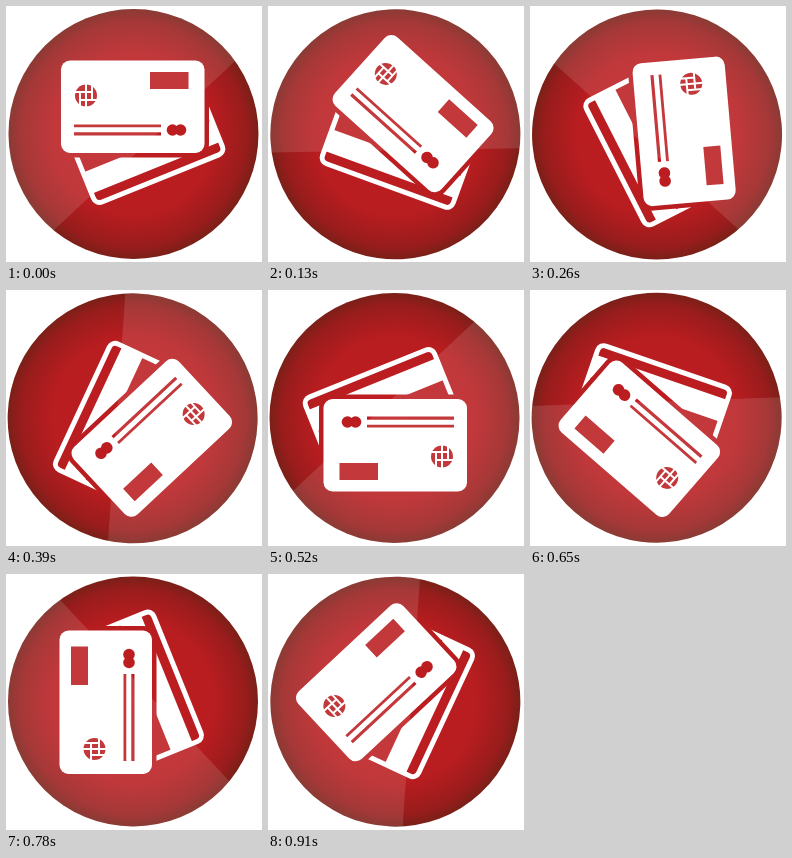
Recreate the animation shown at these times as an HTML page. Size 256 by 256 pixels, loop 1.04 s.

```html
<!DOCTYPE html>
<html lang="en">
<head>
<meta charset="utf-8">
<title>Spinning card badge</title>
<style>
  html, body { margin: 0; width: 100%; height: 100%; overflow: hidden; background: #fff; }
  svg { display: block; width: 100vw; height: 100vh; }
</style>
</head>
<body>
<svg viewBox="0 0 256 256">
  <defs>
    <radialGradient id="red">
      <stop offset="0" stop-color="#c01d20"/>
      <stop offset=".65" stop-color="#b81d20"/>
      <stop offset=".9" stop-color="#991c1c"/>
      <stop offset="1" stop-color="#7a2018"/>
    </radialGradient>
    <clipPath id="disc"><circle cx="127.5" cy="128" r="125"/></clipPath>
    <!-- White areas of the mask become the cards; black areas let the badge through. -->
    <mask id="cards" maskUnits="userSpaceOnUse" x="0" y="0" width="256" height="256">
      <g transform="translate(88 203) rotate(-22)">
        <rect x="1" y="-94" width="144" height="93" rx="9" fill="#fff"/>
        <rect x="6" y="-89" width="134" height="83" rx="4"/>
        <rect x="5" y="-38" width="136" height="23" fill="#fff"/>
      </g>
      <rect x="55" y="54.5" width="143.5" height="92.5" rx="9" fill="#fff" stroke="#000" stroke-width="9" paint-order="stroke"/>
      <path d="M144 66h38.5v17H144zM68 118.5h87v2.8H68zM68 126.3h87v3.2H68z"/>
      <circle cx="166.5" cy="124" r="5.8"/>
      <circle cx="174.5" cy="124" r="5.8"/>
      <circle cx="80" cy="89.5" r="11"/>
      <path d="M68 86h17M74 94h18M80 78v24M74 86v14M86 79v15" fill="none" stroke="#fff" stroke-width="2"/>
    </mask>
  </defs>
  <g id="badge">
    <circle cx="127.5" cy="128" r="125" fill="url(#red)"/>
    <g clip-path="url(#disc)">
      <path d="M-200 16H200V-200H-200z" transform="translate(127.5 128) rotate(-43)" fill="#fff" opacity=".12"/>
    </g>
    <rect width="256" height="256" fill="#fff" mask="url(#cards)"/>
  </g>
</svg>
<script>
  const badge = document.getElementById('badge');
  const angles = [0, 42, 85, 137, 180, 221, 270, 317];
  const stepMs = 130;

  function draw() {
    const step = Math.floor(performance.now() / stepMs) % angles.length;
    badge.setAttribute('transform', `rotate(${angles[step]} 127 128)`);
    requestAnimationFrame(draw);
  }
  draw();
</script>
</body>
</html>
```
